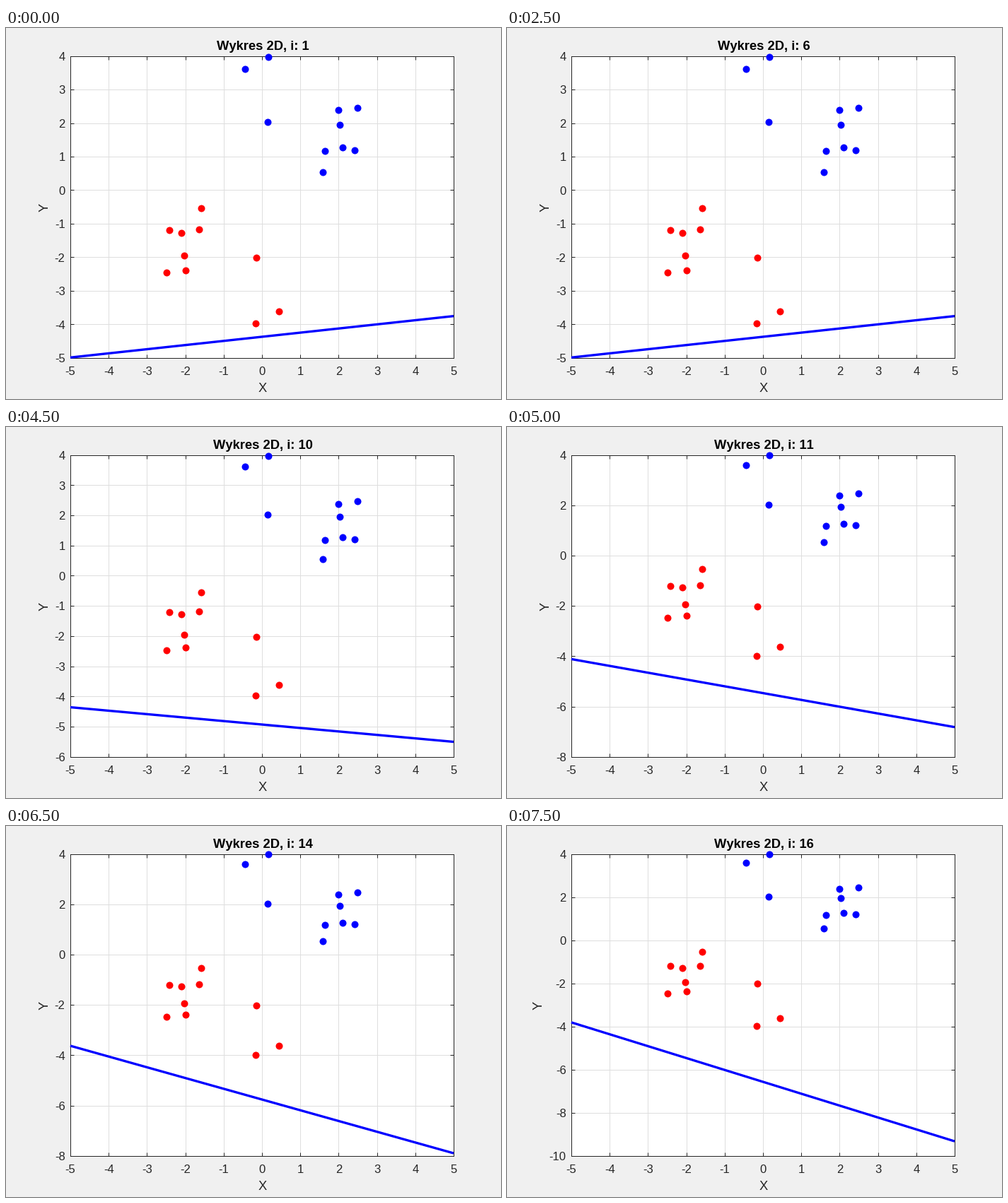
Recreate the animation shown at these times as a matplotlib script. Size 700 px wide and 525 px high, loop 8000 ms.

```python
import math

import numpy as np
import matplotlib.pyplot as plt
from matplotlib.animation import FuncAnimation

W, H, DPI = 700, 525, 100
LEFT, RIGHT, TOP, BOTTOM = 91, 633, 39.7, 466.7
STEPS, STEP_MS, FIRST_UPDATE = 16, 500, 10
INK = "#262626"

# The red class mirrors the blue one; the first seven points drive the updates.
BLUE = np.array([
    (2.000, 2.385), (2.028, 1.945), (2.495, 2.461), (2.416, 1.196),
    (0.167, 3.978), (2.104, 1.274), (1.639, 1.178), (1.589, 0.543),
    (0.146, 2.023), (-0.450, 3.612),
])
RED = -BLUE
START = np.array([-0.1235, 1.0, 4.373])
RATE, BIAS_STEP = 0.1379, 2.179

plt.rcParams["font.family"] = "Liberation Sans"
plt.rcParams["text.kerning_factor"] = 6  # practically no kerning


def pt(pixels):
    return pixels * 72 / DPI


def label(x, y, text, size=16.67, **style):
    style = {"color": INK, "ha": "center", "va": "baseline", **style}
    return fig.text(x / W, 1 - y / H, text, fontsize=pt(size), **style)


def weights(step):
    """Weights (w1, w2, bias) after the given training step."""
    w = START.copy()
    for point in RED[:max(0, step - FIRST_UPDATE + 1)]:
        w += [-RATE * point[0], -RATE * point[1], BIAS_STEP]
    return w


def y_scale(lowest):
    """Lower limit and tick spacing that hold the lowest value."""
    spacing = 1 if lowest > -6 else 2
    return spacing * math.floor(lowest / spacing), spacing


fig = plt.figure(figsize=(W / DPI, H / DPI), dpi=DPI, facecolor="#f0f0f0")
ax = fig.add_axes([LEFT / W, 1 - BOTTOM / H,
                   (RIGHT - LEFT) / W, (BOTTOM - TOP) / H])
ax.set_xlim(-5, 5)
ax.set_xticks(range(-5, 6))
ax.set_axisbelow(True)
ax.grid(color="#dedede", linewidth=pt(1))
ax.tick_params(direction="in", length=pt(5.4), width=pt(1), color=INK,
               top=True, right=True, labelbottom=False, labelleft=False)
for spine in ax.spines.values():
    spine.set(linewidth=pt(1), edgecolor=INK)

for points, color in ((BLUE, "#0000ff"), (RED, "#ff0000")):
    ax.scatter(*points.T, s=pt(10) ** 2, color=color, linewidth=0,
               clip_on=False, zorder=5)
boundary, = ax.plot([], [], color="#0000ff", linewidth=pt(3.33),
                    solid_capstyle="butt", clip_on=False, zorder=6)

for x in range(-5, 6):
    label(LEFT + (x + 5) * (RIGHT - LEFT) / 10, 491, str(x))
label(362.5, 515, "X", 18.33)
y_name = label(59.5, 253.5, "Y", 18.33, rotation=90, rotation_mode="anchor")
title = label(363, 31, "", 18.33, color="black", weight="bold")
y_labels = []


def draw(frame):
    step = frame + 1
    w1, w2, bias = weights(step)
    xs = np.array([-5, 5])
    ys = -(w1 * xs + bias) / w2
    boundary.set_data(xs, ys)

    low, spacing = y_scale(ys.min())
    ticks = range(low, 5, spacing)
    ax.set_ylim(low, 4)
    ax.set_yticks(ticks)
    while y_labels:
        y_labels.pop().remove()
    for y in ticks:
        tick_y = TOP + (4 - y) * (BOTTOM - TOP) / (4 - low)
        y_labels.append(label(83.5, tick_y + 6.3, str(y), ha="right"))

    y_name.set_x((49.5 if low <= -10 else 59.5) / W)
    title.set_text(f"Wykres 2D, i: {step}")
    return [boundary, title, y_name, *y_labels]


anim = FuncAnimation(fig, draw, frames=STEPS, init_func=lambda: draw(0),
                     interval=STEP_MS, repeat=True, repeat_delay=0, blit=False)
plt.show()
```
